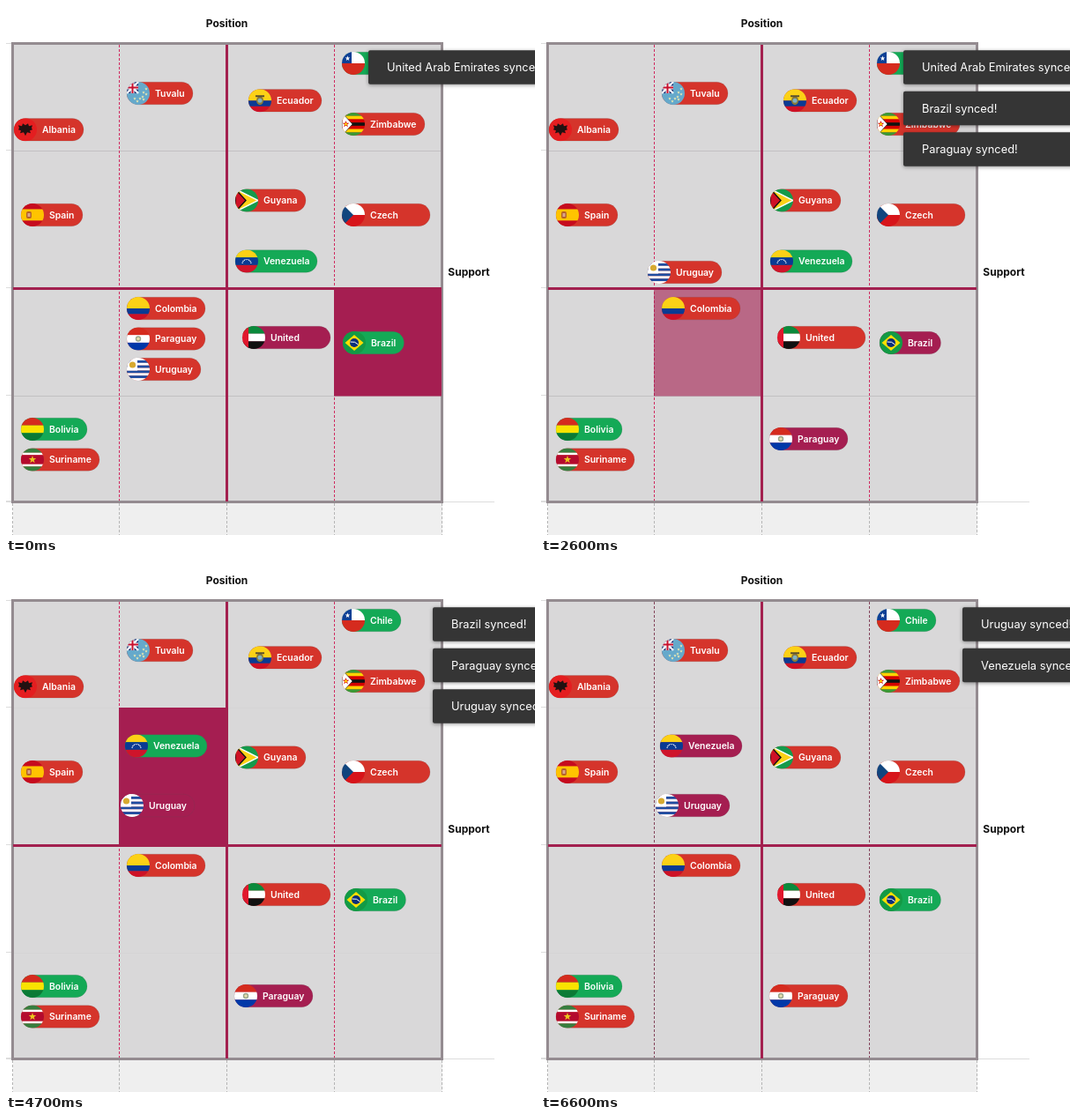
These frames come from a looping animation (600x600 px, 6.7 s). An HTML page:

```html
<!DOCTYPE html>
<html lang="en">
<head>
<meta charset="utf-8">
<title>Position and support board</title>
<style>
html, body { margin: 0; width: 100%; height: 100%; overflow: hidden; background: #fff; }
svg { display: block; width: 600px; height: 600px; font-family: Inter, Roboto, sans-serif; }
.axis { font-size: 12px; font-weight: 700; fill: #111; text-anchor: middle; }
.pill text { font-size: 10.4px; font-weight: 600; fill: #fff; }
.toast text { font-size: 12.85px; fill: #fff; }
.toast rect { fill: #353535; filter: drop-shadow(0 1px 2px #0006); }
</style>
</head>
<body>
<svg id="stage" viewBox="0 0 600 600">
  <clipPath id="disc"><circle cx="13" cy="0" r="13"/></clipPath>
  <g id="board"></g>
  <g id="cells"></g>
  <g id="axes"></g>
  <g id="pills"></g>
  <g id="toasts"></g>
</svg>
<script>
const LOOP = 6700, STEP = 100;
const RED = '#d5342b', GREEN = '#14a956', PLUM = '#a51e51';
const COLS = [8, 128, 250, 372, 494], ROWS = [43, 164, 320, 442, 562];
const $ = id => document.getElementById(id);
const clamp = v => Math.max(0, Math.min(1, v));
const ease = v => v * v * (3 - 2 * v);

const rect = (x, y, w, h, fill, more = '') =>
  `<rect x="${x}" y="${y}" width="${w}" height="${h}" fill="${fill}" ${more}/>`;
const line = (x1, y1, x2, y2, color, w = 1, more = '') =>
  `<path d="M${x1} ${y1}L${x2} ${y2}" stroke="${color}" stroke-width="${w}" ${more}/>`;
const poly = (points, fill, more = '') => `<polygon points="${points}" fill="${fill}" ${more}/>`;
const dot = (x, y, r, fill) => `<circle cx="${x}" cy="${y}" r="${r}" fill="${fill}"/>`;

function star(x, y, r, fill) {
  const points = Array.from({ length: 10 }, (_, i) => {
    const a = i * Math.PI / 5 - Math.PI / 2, d = i % 2 ? r * 0.4 : r;
    return `${x + d * Math.cos(a)},${y + d * Math.sin(a)}`;
  });
  return poly(points.join(' '), fill);
}

// Horizontal bands filling a 26 x 26 flag; weights set their shares.
function bands(colors, weights = []) {
  const share = i => weights[i] || 1;
  const unit = 26 / colors.reduce((sum, _, i) => sum + share(i), 0);
  let y = -13;
  return colors.map((c, i) => {
    const h = share(i) * unit, band = rect(0, y, 26, h + 0.1, c);
    y += h;
    return band;
  }).join('');
}

const starArc = Array.from({ length: 8 }, (_, i) => {
  const a = Math.PI * (1.08 + i * 0.12);
  return dot(13 + 5 * Math.cos(a), 3 + 5 * Math.sin(a), 0.7, '#fff');
}).join('');
const tricolor = bands(['#fcd116', '#0a3a93', '#ce1126'], [2, 1, 1]);

const flags = {
  Albania: rect(0, -13, 26, 26, '#e41e20') +
    '<path d="M13-5L10-7 9-4 5-5 6-2 5 0 8 1 7 4 11 3 13 7 15 3 19 4 18 1 21 0 20-2 21-5 17-4 16-7Z" fill="#211"/>',
  Tuvalu: rect(0, -13, 26, 26, '#65a9cb') + rect(0, -13, 13, 13, '#1c2f73') +
    line(0, -13, 13, 0, '#fff', 2.4) + line(13, -13, 0, 0, '#fff', 2.4) +
    line(6.5, -13, 6.5, 0, '#fff', 4) + line(0, -6.5, 13, -6.5, '#fff', 4) +
    line(6.5, -13, 6.5, 0, '#c8102e', 2) + line(0, -6.5, 13, -6.5, '#c8102e', 2) +
    [[22, -5], [19, -1], [22, 1], [18, 4], [15, 6], [19, 7], [12, 9], [9, 6]]
      .map(([x, y]) => star(x, y, 1.8, '#f4ecb0')).join(''),
  Ecuador: tricolor + '<ellipse cx="13" cy="0" rx="4" ry="5" fill="#8b7a38"/>' +
    dot(13, 0, 2.5, '#7fb2c4') + line(8, -5, 18, -5, '#5d512c', 2),
  Chile: bands(['#fff', '#d52b1e']) + rect(0, -13, 11, 13, '#0d3f94') + star(6.5, -5.5, 3, '#fff'),
  Zimbabwe: bands(['#3a9a35', '#ffd200', '#d40000', '#111', '#d40000', '#ffd200', '#3a9a35']) +
    poly('0,-13 12,0 0,13', '#fff', 'stroke="#222" stroke-width=".7"') +
    star(4.5, 0, 4, '#d40000') + dot(4.5, 0, 1.5, '#ffd200'),
  Spain: bands(['#c60b1e', '#ffc400', '#c60b1e'], [1, 2, 1]) +
    rect(6, -4, 6, 8, '#b5622a', 'rx="2"') + rect(7.5, -2, 3, 4, '#d9a58c'),
  Guyana: rect(0, -13, 26, 26, '#159a4b') +
    poly('0,-13 26,0 0,13', '#fcd116', 'stroke="#fff" stroke-width="1.5"') +
    poly('0,-13 12,0 0,13', '#ce1126', 'stroke="#111" stroke-width="1.4"'),
  Czech: bands(['#fff', '#d7141a']) + poly('0,-13 13,0 0,13', '#11457e'),
  Colombia: tricolor,
  United: bands(['#0b8a3c', '#fff', '#111']) + rect(0, -13, 7, 26, '#e0182d'),
  Bolivia: bands(['#d52b1e', '#f9e300', '#0a7a36']),
  Suriname: bands(['#377e3f', '#fff', '#b40a2d', '#fff', '#377e3f'], [2, 1, 4, 1, 2]) +
    star(13, 0, 4.5, '#ecc81d'),
  Venezuela: bands(['#fcd116', '#0a3a93', '#cf142b']) + starArc,
  Paraguay: bands(['#d52b1e', '#fff', '#0038a8']) + dot(13, 0, 3.2, '#9aa58a') + dot(13, 0, 1.8, '#e6dfae'),
  Uruguay: bands(Array.from({ length: 9 }, (_, i) => i % 2 ? '#1f4da1' : '#fff')) +
    rect(0, -13, 12, 14.5, '#fff') + dot(6.5, -5, 3.6, '#d7a930'),
  Brazil: rect(0, -13, 26, 26, '#139a45') + poly('2.5,0 13,-9 23.5,0 13,9', '#fedf00') +
    dot(13, 0, 5, '#0b2f7a') + '<path d="M8.5-1Q14-2 17.5 2" fill="none" stroke="#fff"/>'
};

// Each pill: name, left, middle, width, [time, fill] changes, [time, left, middle] path.
const pills = [
  ['Albania', 9, 140.3, 79], ['Tuvalu', 137, 99, 75], ['Ecuador', 275, 107.3, 83],
  ['Chile', 381, 65, 67, [[0, GREEN]]], ['Zimbabwe', 381, 134, 94],
  ['Spain', 17, 237, 70], ['Guyana', 260, 220.5, 80], ['Czech', 381, 237, 100],
  ['Colombia', 137, 343, 89],
  ['United', 268, 376, 100, [[0, PLUM], [2300, RED]]],
  ['Bolivia', 17, 480, 75, [[0, GREEN]]], ['Suriname', 17, 514.5, 89],
  ['Paraguay', 137, 377.5, 89, [[0, RED], [2000, PLUM], [5500, RED]],
    [[1200, 137, 377.5], [1800, 259, 491]]],
  ['Uruguay', 137, 412, 84, [[0, RED], [3300, PLUM]],
    [[2250, 137, 412], [2600, 121, 302], [2900, 130, 275]]],
  ['Venezuela', 260, 289.5, 93, [[0, GREEN], [5200, PLUM]],
    [[4000, 260, 289.5], [4600, 135, 207.5]]],
  ['Brazil', 382, 382, 69.5, [[0, GREEN], [700, PLUM], [4300, GREEN]],
    [[0, 382, 382], [300, 384, 382]]]
];

// Hovered cells: column, row, start, end.
const hovers = [
  [3, 2, -500, 450],
  [1, 2, 1150, 1400], [2, 2, 1400, 1550], [2, 3, 1550, 1950],
  [1, 2, 2250, 2540], [1, 1, 2650, 3000],
  [2, 1, 3950, 4300], [1, 1, 4300, 4950]
];
const FADE = 150;

// Toasts: message, start, end, left edge its width asks for.
const toasts = [
  ['United Arab Emirates', -1000, 3200, 411],
  ['Brazil', 700, 5100, 504],
  ['Paraguay', 2050, 6150, 484],
  ['Uruguay', 3350, 9000, 489],
  ['Venezuela', 5250, 9000, 478]
];

$('board').innerHTML =
  ROWS.map(y => line(0, y - 0.5, 8, y - 0.5, '#ddd')).join('') +
  line(0, 562.5, 554, 562.5, '#ddd') +
  rect(8, 563, 487, 37, '#efefef') +
  COLS.map(x => line(x + 0.5 - (x === 8), 564, x + 0.5 - (x === 8), 600, '#b5b5b5', 1, 'stroke-dasharray="3 2"')).join('') +
  rect(8, 43, 487, 520, '#d9d8d9') +
  `<g id="rules">${[164.5, 442.5].map(y => line(8, y, 494, y, '#c2c0c2')).join('')}</g>` +
  `<g id="dashes">${[128.5, 372.5].map(x => line(x, 44, x, 562, 'inherit', 1, 'stroke-dasharray="3 2"')
    .replace('stroke="inherit"', '')).join('')}</g>` +
  rect(7.5, 42.5, 487, 520, 'none', 'stroke="#948b90" stroke-width="3"');
$('cells').innerHTML = hovers.map(([c, r]) =>
  rect(COLS[c], ROWS[r], COLS[c + 1] - COLS[c], ROWS[r + 1] - ROWS[r] + 0.5, PLUM)).join('');
$('axes').innerHTML = line(250.5, 44, 250.5, 562, '#a3204f', 3) + line(8, 320.5, 494, 320.5, '#a3204f', 3) +
  '<text class="axis" x="250.5" y="24">Position</text><text class="axis" x="525" y="306">Support</text>';
$('pills').innerHTML = pills.map(([name, , , w]) =>
  `<g class="pill">${rect(0, -12.8, w, 25.6, RED, 'rx="12.8" stroke="#5554" stroke-width=".6"')}
   <g clip-path="url(#disc)">${flags[name]}</g><text x="32" y="3.6">${name}</text></g>`).join('');
$('toasts').innerHTML = toasts.map(([name]) =>
  `<g class="toast">${rect(0, 0, 240, 38.5, '#353535', 'rx="2"')}<text x="21" y="24">${name} synced!</text></g>`).join('');

function along(path, t) {
  let [, x, y] = path[0];
  for (let i = 1; i < path.length; i++) {
    const [t0, x0, y0] = path[i - 1], [t1, x1, y1] = path[i];
    if (t < t0) break;
    const k = ease(clamp((t - t0) / (t1 - t0)));
    x = x0 + (x1 - x0) * k;
    y = y0 + (y1 - y0) * k;
  }
  return [x, y];
}

function draw(t) {
  let dragging = false;
  hovers.forEach(([, , from, to], i) => {
    const alpha = Math.min(clamp((t - from) / FADE), clamp(1 - (t - to) / FADE));
    $('cells').children[i].setAttribute('opacity', alpha);
    dragging = dragging || alpha > 0;
  });
  $('dashes').setAttribute('stroke', dragging ? '#d0295f' : '#83435a');
  $('rules').setAttribute('opacity', dragging && t < 3500 ? 1 : 0.15);

  pills.forEach(([, left, middle, , fills = [[0, RED]], path = [[0, left, middle]]], i) => {
    const node = $('pills').children[i];
    node.setAttribute('transform', `translate(${along(path, t)})`);
    node.firstElementChild.setAttribute('fill', fills.filter(f => f[0] <= t).pop()[1]);
  });

  const OUT = 300;
  const left = Math.min(...toasts.filter(m => t >= m[1] && t < m[2] + OUT).map(m => m[3]));
  let y = 50.3;
  toasts.forEach(([, from, to], i) => {
    const node = $('toasts').children[i];
    const shown = ease(clamp((t - from) / 300)), gone = ease(clamp((t - to) / OUT));
    node.setAttribute('opacity', shown * (1 - gone));
    node.setAttribute('transform', `translate(${left} ${y + 35 * (1 - shown) - 40 * gone})`);
    if (t >= from) y += 46.5 * (1 - gone);
  });
}

const start = performance.now();
function tick() {
  const t = (performance.now() - start) % LOOP;
  draw(Math.floor(t / STEP) * STEP);
  requestAnimationFrame(tick);
}
tick();
</script>
</body>
</html>
```
